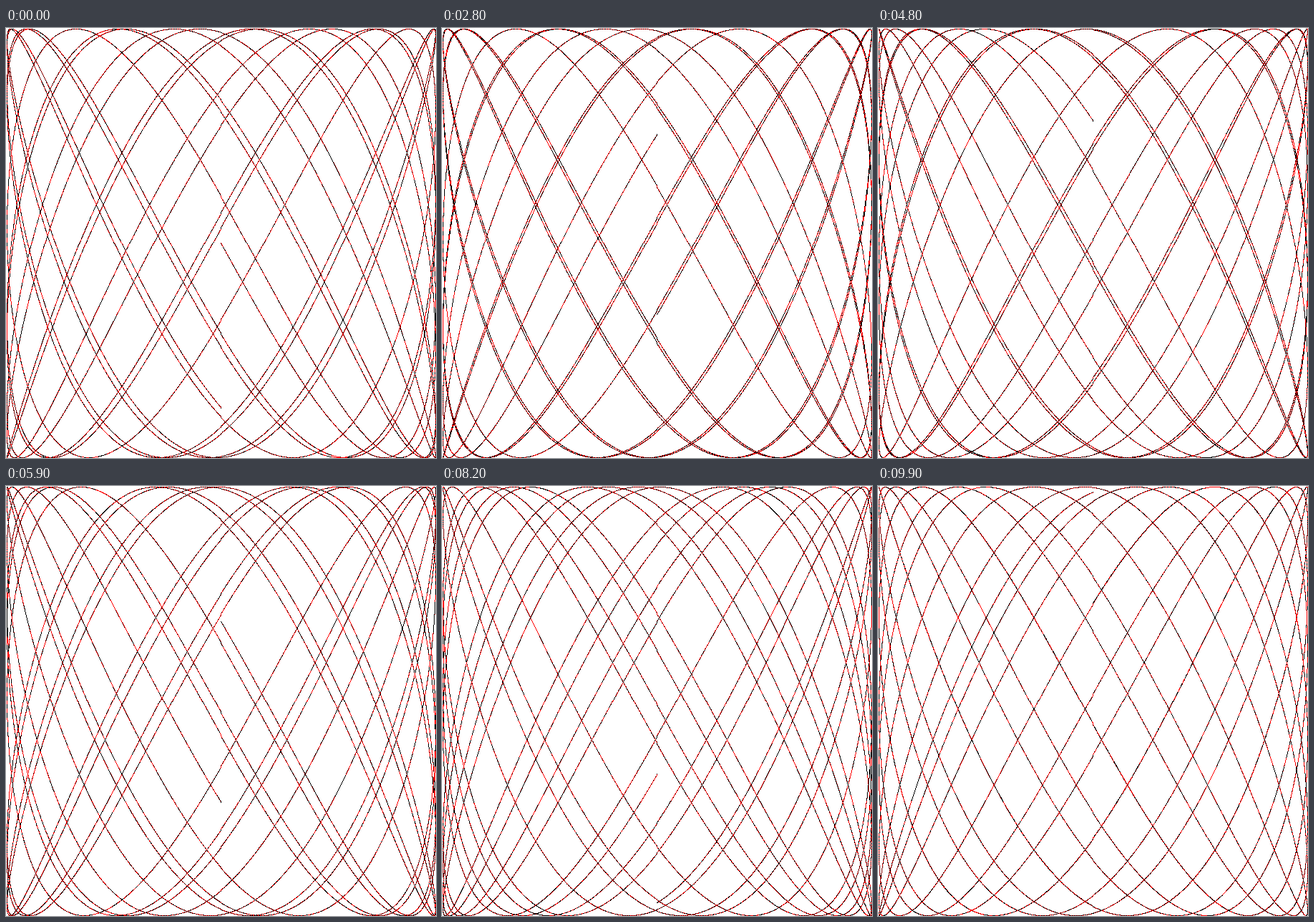
These frames come from a looping animation (601 px wide and 601 px high, 10000 ms). An HTML page with a canvas:

```html
<!DOCTYPE html>
<html lang="en">
<head>
<meta charset="utf-8">
<title>Lissajous curve</title>
<style>
  html, body { margin: 0; width: 100%; height: 100%; overflow: hidden; background: #fff; }
  canvas { display: block; width: 601px; height: 601px; image-rendering: pixelated; }
</style>
</head>
<body>
<canvas id="stage" width="601" height="601"></canvas>
<script>
const RADIUS = 300;
const SIDE = 2 * RADIUS + 1;
const CYCLES = 10;
const STEP = 0.001;
const FREQ = 3 * 0.6046602879796196;
const PHASE_STEP = 0.1;
const POSES = 100;
const POSE_MS = 100;

// Pixel colours as little-endian ABGR
const WHITE = 0xffffffff;
const INKS = [0xff0000ff, 0xff000000];

const ctx = document.getElementById('stage').getContext('2d');
const image = ctx.createImageData(SIDE, SIDE);
const pixels = new Uint32Array(image.data.buffer);

const toPixel = v => RADIUS + Math.trunc(v * RADIUS + 0.5);

// The horizontal swing and the angle are the same for every phase
const columns = [];
const angles = [];
for (let t = 0; t < CYCLES * 2 * Math.PI; t += STEP) {
  columns.push(toPixel(Math.sin(t)));
  angles.push(t * FREQ);
}

function draw(pose) {
  const phase = pose * PHASE_STEP;
  pixels.fill(WHITE);
  for (let i = 0; i < columns.length; i++) {
    const row = toPixel(Math.sin(angles[i] + phase));
    pixels[row * SIDE + columns[i]] = INKS[i % 2];
  }
  ctx.putImageData(image, 0, 0);
}

const start = performance.now();
let shown = -1;

function tick() {
  const elapsed = performance.now() - start;
  const pose = Math.floor(elapsed / POSE_MS) % POSES;
  if (pose !== shown) {
    draw(pose);
    shown = pose;
  }
  requestAnimationFrame(tick);
}
tick();
</script>
</body>
</html>
```
